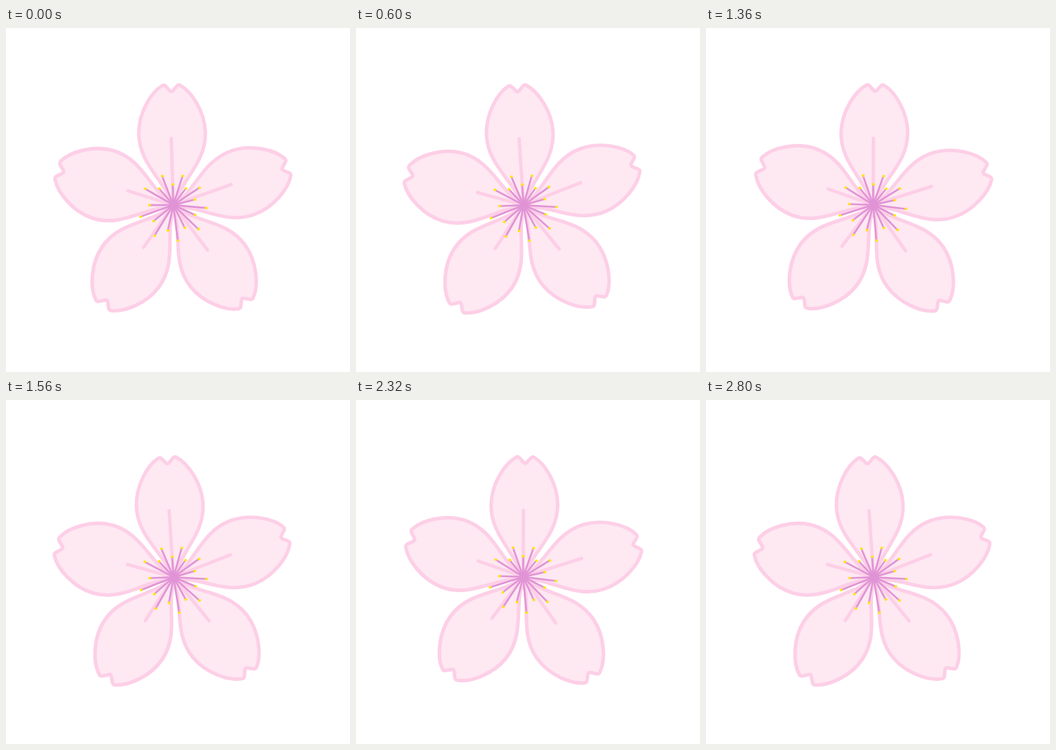
An HTML page for the animation above (2.88 s loop, 480 by 480 pixels).

```html
<!DOCTYPE html>
<html lang="en">
<head>
<meta charset="utf-8">
<title>Swaying blossom</title>
<style>
  html, body { margin: 0; width: 100%; height: 100%; overflow: hidden; background: #fff; }
  svg { display: block; width: 100%; height: 100%; }
  path { stroke-linecap: round; stroke-linejoin: round; }
  .petal { fill: #fee8f2; stroke: #fdcfe7; stroke-width: 4.8; }
  .vein { stroke: #fdcfe7; stroke-width: 4.6; }
  .stamen { stroke: #e094d6; stroke-width: 2.6; }
  .anther { stroke: #ffe51f; stroke-width: 3.6; }
  .heart { stroke: #e094d6; stroke-width: 10; }
</style>
</head>
<body>
<svg viewBox="0 0 480 480"><g id="flower"></g></svg>
<script>
const flower = document.getElementById('flower');
const heart = [233.5, 247];
const radians = degrees => degrees * Math.PI / 180;

// Point around the heart; angles run clockwise from straight up.
const around = (angle, radius) => [
  heart[0] + radius * Math.sin(radians(angle)),
  heart[1] - radius * Math.cos(radians(angle))
];

function addPath(className, d, transform = '') {
  const path = document.createElementNS('http://www.w3.org/2000/svg', 'path');
  path.setAttribute('class', className);
  path.setAttribute('d', d);
  path.setAttribute('transform', transform);
  flower.append(path);
}

// Right half of an upright petal, from base to notch; side -1 mirrors it.
const halfPetal = side => {
  const at = (x, y) => `${side * x} ${y} `;
  return `M0 0 L${at(2, 0)} C${at(9, -36)}${at(47, -58)}${at(46.5, -103)}
    C${at(46, -132)}${at(28, -160)}${at(13, -168.5)}
    Q${at(10, -171)}${at(7, -167)} L${at(2, -161.5)} Q${at(1, -160.5)}0 -160.5`;
};
const petal = halfPetal(1) + halfPetal(-1);

// Petals broaden slightly and veins shorten, going clockwise.
for (let i = 0; i < 5; i++) {
  addPath('petal', petal,
    `translate(233.5 249) rotate(${72.1 * i - 1}) scale(${1 + 0.015 * i} 1)`);
}
for (let i = 0; i < 5; i++) {
  addPath('vein', `M${heart} L${around(72.3 * i - 1.8, 93 * 0.92 ** i)}`);
}

// Long and short stamens alternate, a little longer towards the bottom.
const tips = Array.from({ length: 18 }, (_, i) => {
  const angle = 19.4 * i - 60;
  const base = i % 2 ? 32.5 : 46.5;
  return around(angle, base - 4 * Math.cos(radians(angle - 15)));
});
for (const tip of tips) addPath('stamen', `M${heart} L${tip}`);
addPath('heart', `M${heart} h0.01`);
for (const tip of tips) addPath('anther', `M${tip} h0.6`);

// A sine sway sampled every 40 ms and snapped to steps of two degrees.
function draw() {
  const tick = Math.floor((performance.now() - start) % 2880 / 40);
  const angle = 2 * Math.round(1.8 * Math.sin(2 * Math.PI * (tick - 1) / 24));
  flower.setAttribute('transform', `rotate(${angle} 240 240)`);
  requestAnimationFrame(draw);
}
const start = performance.now();
draw();
</script>
</body>
</html>
```
